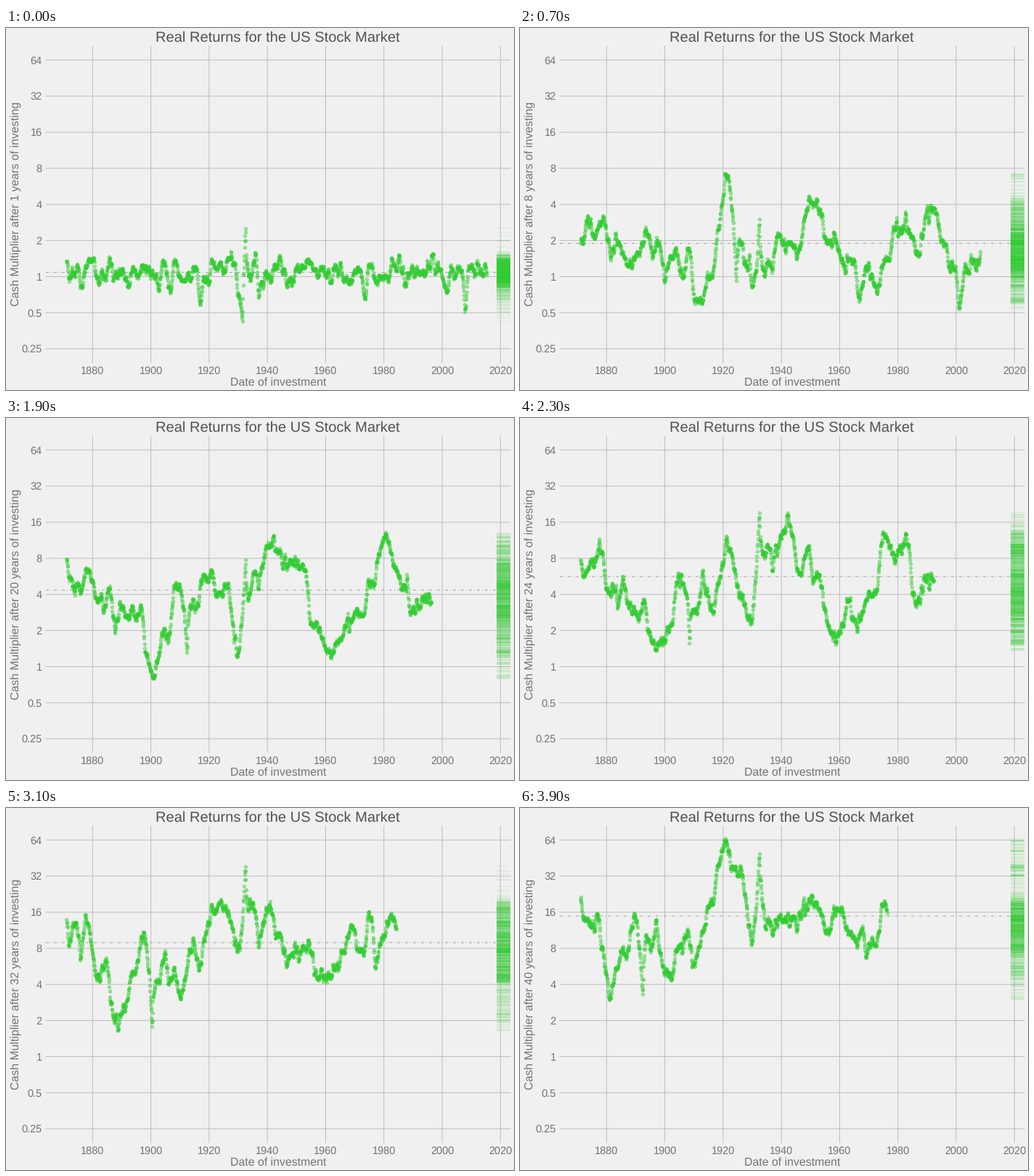
Write a matplotlib script that moves like this. It is 700x500 px and loops after 4 s.

```python
import numpy as np
import matplotlib.pyplot as plt
from matplotlib.animation import FuncAnimation
from matplotlib.collections import LineCollection
from matplotlib.colors import to_rgba

W, H, DPI = 700, 500, 100
PT = 72 / DPI
LEFT, RIGHT, TOP, BOTTOM = 55, 695, 25, 462
BACK, GRID, TEXT, DARK, GREEN = "#f0f0f0", "#bdbdbd", "#737373", "#525252", "#32cd32"
FIRST, MONTHS, YEARS = 1871, 1744, 40

# Main turning points of the inflation-adjusted share price: (date, price)
TURNS = [
    (1871, 36), (1876.1, 41), (1877.45, 27), (1881.45, 68), (1885, 51),
    (1887.4, 72), (1892.2, 78), (1893.6, 58), (1899.3, 90), (1901.45, 110),
    (1903.8, 77), (1906, 116), (1907.87, 70), (1909.65, 110), (1914.95, 73),
    (1916.85, 90), (1917.95, 50), (1920.95, 35), (1924, 51), (1927, 77),
    (1929.7, 181), (1930.25, 148), (1931.45, 93), (1932.45, 35), (1932.7, 60),
    (1933.5, 82), (1935.2, 62), (1937.1, 126), (1938.25, 72), (1942.3, 50),
    (1946.4, 98), (1949.45, 59), (1954, 95), (1956.3, 168), (1961.92, 238),
    (1962.45, 185), (1966, 290), (1970.45, 200), (1973, 276), (1974.75, 134),
    (1976.7, 180), (1982.55, 116), (1987.63, 285), (1987.92, 212), (1995, 312),
    (2000.5, 850), (2002.9, 485), (2007.75, 730), (2009.17, 375), (2016.25, 867),
]

# Yearly dividends on the same scale: (date, amount)
DIVIDENDS = [(1871, 2.1), (1885, 3), (1900, 2.8), (1914, 4.7), (1920, 2.8),
             (1925, 3.2), (1930, 5.7), (1947, 3.5), (1966, 8.6), (1980, 7.4),
             (2000, 9.9), (2016, 18)]


def x_of(year):
    return 119.3 + (year - 1880) * 4.014


def y_of(doublings):
    return 343.4 - 49.86 * doublings


def follow(points, dates):
    """Constant growth from one key point to the next."""
    when, value = np.transpose(points)
    return np.exp(np.interp(dates, when, np.log(value)))


def wobble(count):
    """Swings of a few months plus a little monthly scatter."""
    rng = np.random.default_rng(8)
    window = np.hanning(13)
    window /= np.sqrt(np.sum(window ** 2))
    swings = np.convolve(rng.normal(0, 0.05, count), window, "same")
    return swings + rng.normal(0, 0.014, count)


def growth_index(dates):
    """Log2 of the real value of one share with dividends reinvested."""
    price = follow(TURNS, dates) * np.exp(wobble(len(dates)))
    reinvested = np.cumsum(follow(DIVIDENDS, dates) / price) / 12
    return (np.log(price) + reinvested) / np.log(2)


dates = FIRST + np.arange(MONTHS) / 12
index = growth_index(dates)

plt.rcParams["font.family"] = "Liberation Sans"
plt.rcParams["text.hinting"] = "none"
fig = plt.figure(figsize=(W / DPI, H / DPI), dpi=DPI, facecolor=BACK)
ax = fig.add_axes([0, 0, 1, 1])
ax.set(xlim=(0, W), ylim=(H, 0))
ax.axis("off")


def label(x, y, text, px, color=TEXT, ha="center", **kw):
    return ax.text(x, y, text, fontsize=px * PT, color=color, ha=ha,
                   va="baseline", **kw)


def rule(xs, ys, color=GRID, **kw):
    return ax.plot(xs, ys, color=color, lw=PT, zorder=1, snap=False, **kw)[0]


for year in range(1880, 2021, 20):
    rule([x_of(year)] * 2, [TOP, BOTTOM])
    label(x_of(year), 478, str(year), 14.5)
for power in range(-2, 7):
    y = y_of(power)
    rule([LEFT, RIGHT], [y, y])
    label(49.8, y + 5.2, f"{2.0 ** power:g}", 14.5, ha="right")

label(374.6, 19, "Real Returns for the US Stock Market", 20.1, DARK)
label(375, 494, "Date of investment", 15.9)
y_label = label(18, 243.3, "", 15.9, rotation=90, rotation_mode="anchor")

mean_line = rule([LEFT, RIGHT], [0, 0], "#a0a0a0", dashes=(4, 3, 1, 3))
dots = ax.scatter([], [], s=10, facecolors=[to_rgba(GREEN, 0.45)],
                  edgecolors=[to_rgba(GREEN, 0.45)], linewidths=PT, zorder=3)
rug = LineCollection([], colors=[to_rgba(GREEN, 0.11)], linewidths=PT, zorder=2)
dots.set_snap(False)
rug.set_snap(False)
ax.add_collection(rug, autolim=False)


def update(frame):
    years = frame + 1
    held = 12 * years
    doublings = index[held:] - index[:-held]
    ys = y_of(doublings)
    dots.set_offsets(np.column_stack([x_of(dates[:-held]), ys]))
    rug.set_segments([((676, y), (RIGHT, y)) for y in ys])
    mean = y_of(np.log2(np.mean(2 ** doublings)))
    mean_line.set_ydata([mean, mean])
    y_label.set_text(f"Cash Multiplier after {years} years of investing")
    return dots, rug, mean_line, y_label


anim = FuncAnimation(fig, update, frames=YEARS, interval=100, repeat=True,
                     repeat_delay=0, blit=False)
plt.show()
```
